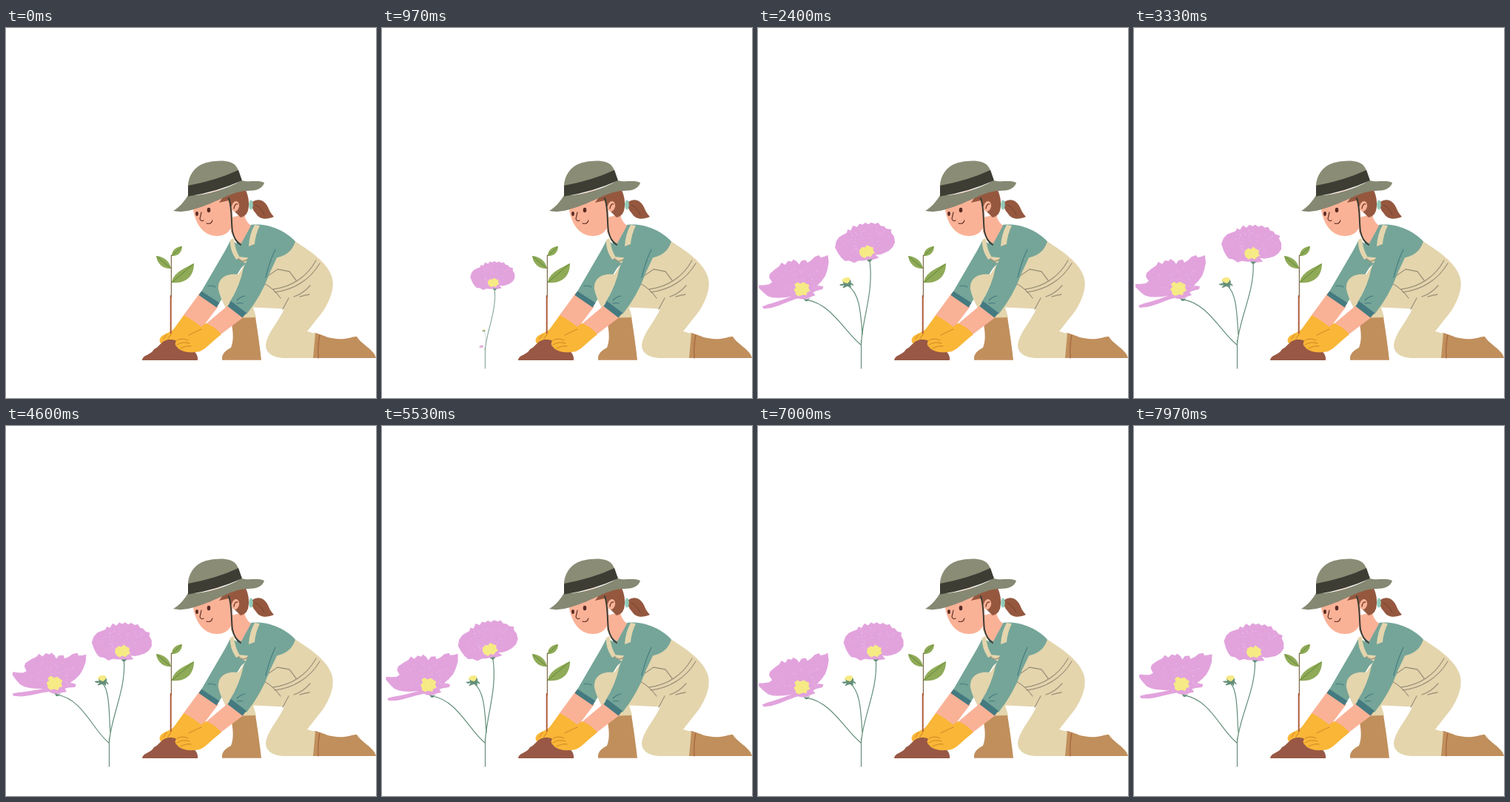
Write an HTML page that moves like this. It is 500x500 px and loops after 8 s.

```html
<!DOCTYPE html>
<html lang="en">
<head>
<meta charset="utf-8">
<title>Planting</title>
<style>
html, body { margin: 0; width: 100%; height: 100%; overflow: hidden; background: #fff; }
svg { display: block; width: 100%; height: 100%; }
.line { fill: none; stroke-linecap: round; stroke-linejoin: round; }
.skin { fill: #fab297; }
.shirt { fill: #75a598; }
.cuff { fill: #447a80; }
.cream { fill: #e4d5ad; }
.boot { fill: #c08f5c; }
.glove { fill: #f9b637; }
.hair { fill: #95583f; }
.leaf { fill: #8fab57; }
.petal { fill: #e2a3dd; }
.heart { fill: #f6ea85; }
.sepal { fill: #648f7a; }
.stem { stroke: #648f7a; stroke-width: 1.2; }
.seam { stroke: #a0957c; stroke-width: 1.3; }
.fold { stroke: #447a80; stroke-width: 1.1; }
.finger { stroke: #cf8526; stroke-width: 1; }
.vein { stroke: #5f8138; stroke-width: .9; }
.ink { stroke: #6b3528; stroke-width: 1.2; }
.speck { fill: #fff; opacity: .42; }
</style>
</head>
<body>
<svg viewBox="0 0 500 500">
  <g id="plant">
    <path class="line stem" d="M139.500 460V422"/>
    <path class="line stem" id="tallStem"/>
    <g id="budBranch">
      <path class="line stem" id="budStem"/>
      <g id="bud">
        <path class="heart" d="M-6-5C-8-7-6-10-4-10C-2-12 0-10 1-11C4-11 5-8 4-6C4-3 0-1-4-2Z"/>
        <path class="sepal" d="M-11-2C-8-3-7-3-5-3L-6-6Q-3-3 0-3Q3-4 4-8Q6-5 5-3C7-2 8-1 8 1C6 0 5-1 4-1C5 1 5 2 4 3C3 1 2 1 0 1C-2 1-4 3-7 3C-6 1-5 0-4-1C-7 0-9 0-11-2Z"/>
      </g>
    </g>
    <g id="lowBranch">
      <path class="line stem" id="lowStem"/>
      <g id="lowFlower">
        <g transform="translate(-66 -367)">
          <path class="petal" d="M2 346L8 346L16 345L20 342L16 336L17 331L24 325L30 321L33 316L38 319L42 314L47 315L49 312L54 315L57 319L60 314L66 313L68 317L73 314L78 309L84 307L86 310L91 309L96 307L97 317L95 327L92 335L87 342L81 348L89 349L88 353L80 355L75 357L78 361L72 363L66 366L59 366L52 364L45 362C35 364 26 364 20 363L14 361L8 356L2 350Z"/>
          <path class="petal" d="M55 359C42 363 28 369 14 372L6 375L8 378L18 377C32 374 42 368 54 365Z"/>
          <path class="heart" d="M50 346L54 343L58 345L62 343L66 345L70 347L69 351L71 355L67 357L66 361L61 360L56 362L52 360L51 356L49 353L52 350Z"/>
        </g>
        <path class="sepal" d="M-4-2Q1 1 5-3L2 1Q0 3-2 1Z"/>
      </g>
    </g>
    <g id="tallFlower">
      <g transform="translate(-161 -317)">
        <path class="petal" d="M118 292L121 284L126 279L131 277L137 275L139 271L143 273L147 267L152 270L156 266L160 268L164 266L168 269L172 267L177 270L181 269L184 274L188 275L191 279L197 281L196 285L199 291L199 299L195 305L189 309L182 311L176 312L170 311L174 316L166 317L158 316L152 316L146 315L140 317L134 313L128 312L124 307L121 301Z"/>
        <path class="heart" d="M150 301L154 298L158 299L161 296L165 299L169 301L168 305L170 308L166 310L163 313L159 311L155 313L151 310L149 306Z"/>
      </g>
      <path class="sepal" d="M-4-1H4L1 2H-1Z"/>
    </g>
  </g>

  <!-- far arm -->
  <path class="glove" d="M241 387L266 404L247 421C235 426 222 424 214 428C206 427 206 420 211 416C218 411 223 412 228 405Z"/>
  <path class="skin" d="M262 358L240 388Q254 395 265 405L287 376Z"/>
  <path class="shirt" d="M304 286L296 301L264 356L288 372L318 324L336 308Z"/>
  <path class="cuff" d="M264 355.500L260.500 361L284.500 377.500L288.500 371.500Z"/>
  <path class="line fold" d="M273 349Q278 347 283 350"/>

  <!-- legs and trunk -->
  <path class="boot" d="M303 390H337C340 410 343 430 345 448.700H292C291 440 297 436 304 432C309 420 306 404 303 390Z"/>
  <path class="boot" d="M417 412L414 446H500C498 435 480 427 474 417C468 416 460 423 440 419C432 418 425 413 417 412Z"/>
  <path class="line" stroke="#a7653c" stroke-width="1.2" d="M424 415Q421 429 422 446"/>
  <path class="cream" d="M391 288.500C412 302 435 317 441 338C444 353 438 367 429 382L407 410L418 413L415 446H378C360 446 351 439 351 428C353 412 369 396 376 379.500L334 377.500L338 391L303 392C298 379 289 365 287 353C286 338 297 331 314 333L324 318L312 311L332 300L360 306Z"/>
  <path class="shirt" d="M311 284L319 281L331 266C354 263 378 274 391 288.500C386 304 374 310 360 311L334 311L314 309Z"/>
  <path class="line seam" d="M361 353C386 350 407 336 419 314M363 357C389 354 411 340 424 318M354 335L367 326L383 329L392 341M347 344Q362 352 371 365M389 363C396 361 404 356 411 348M397 363Q404 361 410 360M382 365L374 380"/>
  <path class="line seam" d="M314 311Q320 319 328 311"/>

  <!-- head -->
  <path class="skin" d="M304 256L322 252Q324 262 331 267L318 291Q308 286 304 275Z"/>
  <path class="skin" d="M252 238C254 262 265 281 285 281C296 281 304 275 306 264V214L270 224Z"/>
  <path class="hair" d="M288 236L302 216L319 212C327 220 330 236 327 247Q324 255 317 256L306 245L301 233Z"/>
  <ellipse class="skin" cx="310" cy="241" rx="5" ry="7" transform="rotate(15 310 241)"/>
  <path class="line ink" d="M308 244Q309 237 313 238" stroke-width=".8"/>
  <path class="hair" d="M333 235C342 229 350 234 354 242Q357 250 362 255C351 260 342 258 338 251Q334 247 332 241Z"/>
  <path class="line" stroke="#6b3528" stroke-width=".7" d="M337 239Q344 242 349 252"/>
  <ellipse cx="331" cy="239" rx="2.8" ry="6.5" fill="#90cbb9"/>
  <path class="line ink" d="M253 243L258 240M267 239Q270 236 275 237"/>
  <ellipse cx="258" cy="251" rx="1.9" ry="3" fill="#592d25"/>
  <ellipse cx="274" cy="246" rx="2.3" ry="3.3" fill="#592d25"/>
  <path class="line ink" d="M264 249L262 258Q264 262 267 260M271 264Q277 266 279 260" stroke-width="1"/>
  <path fill="#8b8c75" d="M246 215C246 197 258 184 273 181.500C290 178 305 179 311 187Q315 192 317 203L247 225Z"/>
  <path fill="#858872" d="M226 247C235 242 241 234 246 226C270 227 298 218 318 206C328 209 340 205 349 209C347 217 338 220 327 220C308 219 290 234 254 245Q239 250 226 247Z"/>
  <path fill="#3d3d34" d="M246 213Q284 206 314 192L319 206Q284 222 246 227.500Z"/>
  <path class="line" stroke="#3d3d34" stroke-width="2" d="M301 230C306 245 304 261 306 275Q309 288 317 293"/>

  <!-- straps and near arm -->
  <path class="cream" d="M303 286L308 284Q309 299 316 310L311 313Q302 300 303 286Z"/>
  <path class="shirt" d="M333 298C341 279 362 276 370 291C372 302 362 318 356 332Q345 362 325 387L302 371Q316 349 321 324Z"/>
  <path class="cream" d="M336 266L343 267Q337 279 336 292L328 295Q329 278 336 266Z"/>
  <path class="line fold" d="M364 299Q356 316 351 337M312 368Q317 363 323 362M312 372Q317 371 320 372" stroke-width=".9"/>
  <path class="skin" d="M301 374L270 400Q282 404 289 415L322 390Z"/>
  <path class="cuff" d="M304 369L299.500 376L319.500 391.500L325 385Z"/>

  <!-- seedling and soil -->
  <path fill="#985845" d="M184 449C185 441 195 443 200 434C207 432 210 421 222 421C233 420 239 431 248 434C254 435 260 441 259 449Z"/>
  <path class="line" stroke="#7c6a48" stroke-width="1.2" d="M223.400 364V307"/>
  <path class="line" stroke="#b05b3d" stroke-width="2" d="M222.700 362V412"/>
  <path class="leaf" d="M223 325C212 326 204 318 203 308C214 309 221 315 223 325ZM224 344C226 331 240 325 254 318C254 335 244 346 224 344ZM224 308C224 300 231 295 238 295C238 303 232 309 224 308Z"/>
  <path class="line vein" d="M223 325L204 309M224 344L253 319M224 308L237 296"/>
  <path class="glove" d="M270 399C258 408 246 412 236 418C228 422 227 428 231 431C236 438 250 440 262 437C271 433 278 424 291 414Q282 403 270 399Z"/>
  <path class="line finger" d="M231 422Q238 418 246 422M231 428Q239 423 248 426M236 433Q242 429 250 430M247 415Q257 410 264 407M217 414L213 420M224 412L219 420"/>
</svg>
<script>
const LOOP = 8000, SWAY = 3840;
const el = id => document.getElementById(id);
const grow = (t, from, to) => Math.min(1, Math.max(0, (t - from) / (to - from)));
const sway = (t, peak) => Math.cos(2 * Math.PI * (t - peak) / SWAY);
const set = (id, name, value) => el(id).setAttribute(name, value);
const scaleAt = (id, x, y, s) => set(id, 'transform', `translate(${x} ${y}) scale(${s}) translate(${-x} ${-y})`);
const pose = (id, x, y, angle) => set(id, 'transform', `translate(${x} ${y}) rotate(${angle})`);

let seed = 7;
const random = () => (seed = seed * 16807 % 2147483647) / 2147483647;

// Light flecks scattered over an ellipse of petals
function addSpecks(id, cx, cy, rx, ry, count) {
  let d = '';
  for (let i = 0; i < count; i++) {
    const a = random() * 2 * Math.PI, r = Math.sqrt(random());
    d += `M${cx + rx * r * Math.cos(a)} ${cy + ry * r * Math.sin(a)}h1v.8h-1z`;
  }
  const path = document.createElementNS('http://www.w3.org/2000/svg', 'path');
  path.setAttribute('class', 'speck');
  path.setAttribute('d', d);
  el(id).append(path);
}
addSpecks('tallFlower', -2, -27, 34, 18, 40);
addSpecks('lowFlower', -8, -28, 32, 17, 40);

function draw(t) {
  scaleAt('plant', 139, 460, grow(t, 300, 1205));
  scaleAt('budBranch', 141, 414, grow(t, 640, 1640));
  scaleAt('lowBranch', 139, 428, grow(t, 880, 1990));

  const a = sway(t, 3890), tx = 156.5 + 7.5 * a, ty = 315.5 + 2.2 * a;
  set('tallStem', 'd', `M139.500 426C${142 + a} 392 ${160.5 + 4.7 * a} 355 ${tx} ${ty}`);
  pose('tallFlower', tx, ty, 7.3 * (a - 0.61));

  const b = sway(t, 4350), bx = 126 + 5 * b;
  set('budStem', 'd', `M141 414C139 390 ${139.5 + b} 358 ${bx} 348`);
  pose('bud', bx, 348, 5 * b);

  const c = sway(t, 4700), lx = 67.2 + 2 * c, ly = 365.5 - 2.3 * c;
  set('lowStem', 'd', `M139 428C118 412 ${lx + 34} ${ly + 5} ${lx} ${ly}`);
  pose('lowFlower', lx, ly, 5.7 * (c + 0.62));
}

const start = performance.now();
function tick() {
  draw((performance.now() - start) % LOOP);
  requestAnimationFrame(tick);
}
tick();
</script>
</body>
</html>
```
